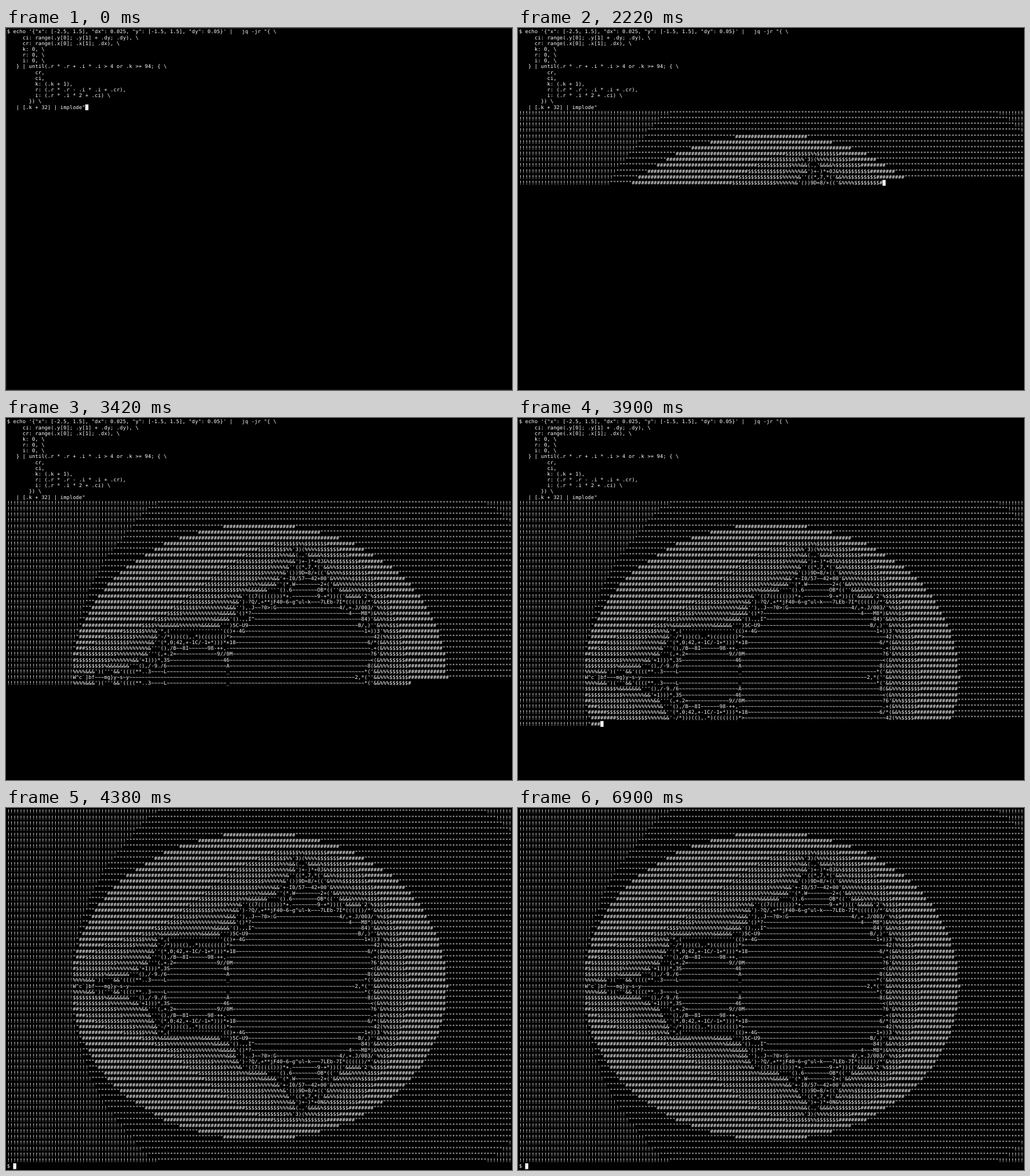
These frames come from a looping animation (884x634 px, 7500 ms). An HTML page with a canvas:

```html
<!DOCTYPE html>
<html lang="en">
<head>
<meta charset="utf-8">
<title>Mandelbrot in jq</title>
<style>
  html, body { margin: 0; width: 100%; height: 100%; overflow: hidden; background: #000; }
  canvas { display: block; }
</style>
</head>
<body>
<canvas id="screen" width="884" height="634"></canvas>
<script>
const COLS = 161, ROWS = 62, CELL_W = 7, CELL_H = 13, PAD = 2, LOOP = 7500;
const WINDOW_W = 1130, WINDOW_H = 810;

const command = String.raw`$ echo '{"x": [-2.5, 1.5], "dx": 0.025, "y": [-1.5, 1.5], "dy": 0.05}' |   jq -jr "{ \
     ci: range(.y[0]; .y[1] + .dy; .dy), \
     cr: range(.x[0]; .x[1]; .dx), \
     k: 0, \
     r: 0, \
     i: 0, \
   } | until(.r * .r + .i * .i > 4 or .k >= 94; { \
         cr,
         ci,
         k: (.k + 1),
         r: (.r * .r - .i * .i + .cr),
         i: (.r * .i * 2 + .ci) \
       }) \
   | [.k + 32] | implode"`.split("\n");

function escapeChar(cr, ci) {
  let r = 0, i = 0, k = 0;
  while (r * r + i * i <= 4 && k < 94) {
    [r, i] = [r * r - i * i + cr, r * i * 2 + ci];
    k++;
  }
  return String.fromCharCode(k + 32);
}

// Coordinates accumulate as jq's range does, rounding errors included.
function mandelbrot() {
  let text = "";
  for (let row = 0, ci = -1.5; row < 61; row++, ci += 0.05)
    for (let col = 0, cr = -2.5; col < COLS; col++, cr += 0.025)
      text += escapeChar(cr, ci);
  return text;
}

const output = mandelbrot();
const CHUNK = 1024;

// The output arrives in whole buffers; the cursor blinks in between.
const steps = [
  { at: 0, chars: 0, cursor: true, border: true },
  { at: 300, chars: 0, cursor: true },
  { at: 2220, chars: 2 * CHUNK, cursor: true },
  { at: 2400, chars: 3 * CHUNK, cursor: true },
  { at: 2820, chars: 4 * CHUNK, cursor: true },
  { at: 3000, chars: 4 * CHUNK, cursor: false },
  { at: 3420, chars: 5 * CHUNK, cursor: false },
  { at: 3900, chars: 6 * CHUNK, cursor: true },
  { at: 4200, chars: 8 * CHUNK, cursor: true },
  { at: 4380, chars: output.length, cursor: true },
  { at: 4800, chars: output.length, cursor: false },
  { at: 5700, chars: output.length, cursor: true },
  { at: 6600, chars: output.length, cursor: false },
  { at: 6900, chars: output.length, cursor: true }
];

const canvas = document.getElementById("screen");
const ctx = canvas.getContext("2d");

function screenLines(chars) {
  const lines = [...command];
  for (let n = 0; n < chars; n += COLS)
    lines.push(output.slice(n, Math.min(n + COLS, chars)));
  if (chars === output.length) lines.push("$ ");
  return lines.slice(-ROWS);
}

function drawBorder() {
  ctx.fillStyle = "#222";
  ctx.fillRect(0, 0, canvas.width, 1);
  ctx.fillRect(0, 0, 1, canvas.height);
  ctx.fillStyle = "#24101a";
  ctx.fillRect(0, canvas.height - 1, canvas.width, 1);
}

function draw({ chars, cursor, border }) {
  ctx.setTransform(1, 0, 0, 1, 0, 0);
  ctx.fillStyle = "#000";
  ctx.fillRect(0, 0, canvas.width, canvas.height);
  if (border) drawBorder();

  ctx.scale(canvas.width / WINDOW_W, canvas.height / WINDOW_H);
  ctx.translate(PAD, PAD);
  ctx.fillStyle = "#fff";
  ctx.font = "11.3px 'DejaVu Sans Mono', monospace";
  ctx.textAlign = "center";
  ctx.textRendering = "geometricPrecision";

  const lines = screenLines(chars);
  lines.forEach((line, row) => {
    for (let col = 0; col < line.length; col++)
      if (line[col] !== " ")
        ctx.fillText(line[col], (col + 0.5) * CELL_W, row * CELL_H + 10);
  });
  if (cursor) {
    const row = lines.length - 1;
    ctx.fillRect(lines[row].length * CELL_W, row * CELL_H, CELL_W, CELL_H);
  }
}

let shown = null;
function tick() {
  const time = performance.now() % LOOP;
  const step = steps.findLast(s => s.at <= time);
  if (step !== shown) draw(shown = step);
  requestAnimationFrame(tick);
}
tick();
</script>
</body>
</html>
```
